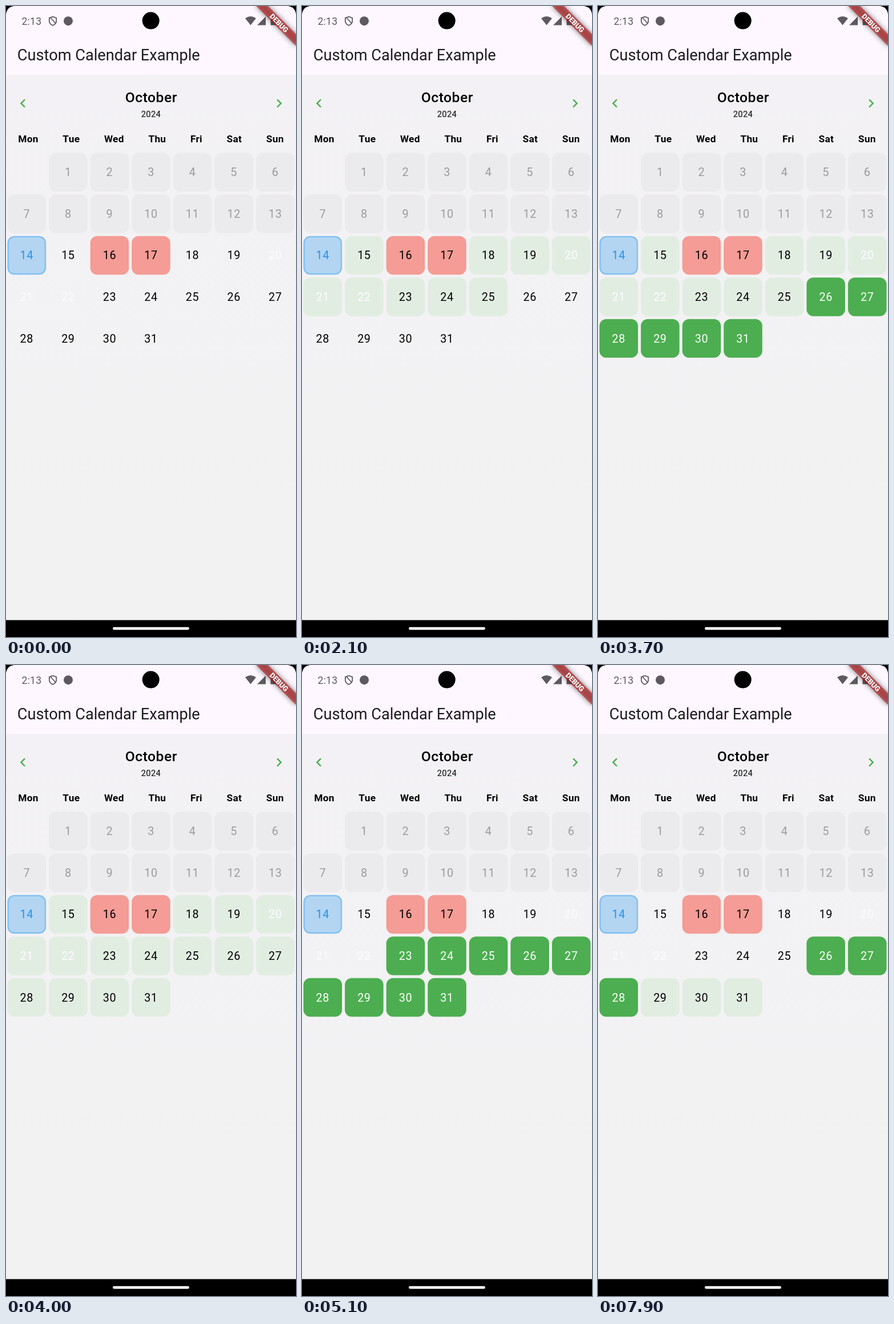
An HTML page that plays this animation: 508x1102 px, repeating every 8 s.

```html
<!DOCTYPE html>
<html lang="en">
<head>
<meta charset="utf-8">
<title>Custom Calendar Example</title>
<style>
  html, body { margin: 0; width: 100%; height: 100%; overflow: hidden; background: #000; }
  body { position: relative; font-family: Roboto, sans-serif; }
  svg { position: absolute; left: 0; top: 0; display: block; }
  text { font-family: Roboto, sans-serif; }
  .mid { text-anchor: middle; }
  #weekdays {
    position: absolute; left: 0; top: 222px; width: 508px;
    display: flex; justify-content: space-around;
    font-size: 17.3px; font-weight: 700; line-height: 20px; letter-spacing: .31px;
  }
</style>
</head>
<body>
<svg width="508" height="1102" viewBox="0 0 508 1102">
  <defs>
    <clipPath id="screen"><path d="M0 1072.4V18Q0 0 18 0H490Q508 0 508 18V1072.4Z"/></clipPath>
    <linearGradient id="page" x1="0" y1="0" x2="0" y2="1">
      <stop offset="0" stop-color="#f3f1f5"/><stop offset="1" stop-color="#f2f2f2"/>
    </linearGradient>
    <filter id="soft" x="-50%" y="-200%" width="200%" height="500%"><feGaussianBlur stdDeviation="4.8"/></filter>
  </defs>

  <g clip-path="url(#screen)">
    <rect width="508" height="1073" fill="url(#page)"/>
    <rect width="508" height="120.5" fill="#fef7ff"/>

    <!-- status bar -->
    <g fill="#5c5a60">
      <text x="27.5" y="32.7" font-size="17.6" letter-spacing=".2">2:13</text>
      <path d="M82 18.7L88.2 21V26Q88.2 31.3 82 34Q75.8 31.3 75.8 26V21ZM78 20.5L87 30.5" fill="none" stroke="#5c5a60" stroke-width="1.8"/>
      <circle cx="109" cy="26.2" r="8"/>
      <path d="M419 21.6Q428.5 14.6 438 21.6L428.5 33.4Z"/>
      <path d="M440 33.4L455 18.4V33.4Z"/>
      <path d="M463.5 20H466.5V18.3H471.5V20H474.5V33.6H463.5Z"/>
    </g>
    <circle cx="253.7" cy="25.6" r="15" fill="#000"/>

    <text x="19.8" y="94.7" font-size="27.2" fill="#1d1b20">Custom Calendar Example</text>

    <!-- month header -->
    <g fill="#4caf50">
      <path transform="translate(14.8 155.2) scale(1.235)" d="M15.41 7.41L14 6L8 12L14 18L15.41 16.59L10.83 12Z"/>
      <path transform="translate(463.6 155.2) scale(1.235)" d="M8.59 16.59L10 18L16 12L10 6L8.59 7.41L13.17 12Z"/>
    </g>
    <text class="mid" x="254.3" y="167.7" font-size="24.7" font-weight="500" letter-spacing=".5">October</text>
    <text class="mid" x="254" y="193.7" font-size="14.8" letter-spacing=".31">2024</text>

    <g id="days"></g>

    <!-- corner ribbon -->
    <g transform="translate(508 0) rotate(45)">
      <rect x="-49.4" y="34.6" width="98.8" height="14.8" fill="#000" fill-opacity=".5" filter="url(#soft)"/>
      <rect x="-49.4" y="34.6" width="98.8" height="14.8" fill="#b71c1c" fill-opacity=".627"/>
      <text class="mid" y="46.5" font-size="12.6" font-weight="900" fill="#fff">DEBUG</text>
    </g>
  </g>
  <rect x="187" y="1084.7" width="134" height="4.8" rx="2.4" fill="#fff"/>
</svg>
<div id="weekdays"><span>Mon</span><span>Tue</span><span>Wed</span><span>Thu</span><span>Fri</span><span>Sat</span><span>Sun</span></div>

<script>
const LOOP = 8000, PITCH = 508 / 7, MARGIN = 2.5, SIZE = PITCH - 2 * MARGIN, TOP = 256.5;
const TODAY = 14, LAST = 31;
const isBooked = d => d === 16 || d === 17;
const isSpecial = d => d >= 20 && d <= 22;

// Each gesture spans a range from its first day to the day under the finger.
// On release the range is selected, or cleared if its first day was selected.
const tap = (time, day) => ({ path: [[time, day]], release: time });
const gestures = [
  { path: [[1100, 15], [1300, 16], [1400, 17], [1500, 18], [1800, 25], [2200, 31]], release: 2700 },
  { path: [[3200, 15], [3300, 16], [3400, 17], [3500, 18], [3700, 25], [3900, 31]], release: 4100 },
  { path: [[4800, 23], [4900, 30], [5000, 31]], release: 5100 },
  tap(5700, 23),
  tap(6400, 24),
  tap(6800, 25),
  { path: [[7500, 29], [7700, 30], [7800, 31]], release: LOOP }
];

function stateAt(time) {
  const selected = new Set(), preview = new Set();
  for (const { path, release } of gestures) {
    const reached = path.filter(([t]) => t <= time);
    if (!reached.length) break;
    const first = path[0][1], current = reached[reached.length - 1][1];
    const clearing = selected.has(first), done = time >= release;
    for (let d = first; d <= current; d++) {
      if (isBooked(d)) continue;
      if (!done) preview.add(d);
      else if (clearing) selected.delete(d);
      else selected.add(d);
    }
  }
  return { selected, preview };
}

// Returns [background, text colour].
function look(day, { selected, preview }) {
  if (day < TODAY) return ['#ebeaed', '#9b9a9d'];
  if (day === TODAY) return ['#b3d5f2', '#2b90e3'];
  if (isBooked(day)) return ['#f49c95', '#000'];
  const plain = isSpecial(day) ? '#fcfcfc' : '#000';
  if (preview.has(day)) return ['#e2ede2', plain];
  if (selected.has(day)) return [isSpecial(day) ? '#f7d7aa' : '#4cae50', '#fff'];
  return ['none', plain];
}

function add(name, attrs) {
  const node = document.createElementNS('http://www.w3.org/2000/svg', name);
  for (const key in attrs) node.setAttribute(key, attrs[key]);
  return document.getElementById('days').appendChild(node);
}

// The month starts on a Tuesday, so the day number is also its grid index.
const cells = Array.from({ length: LAST }, (_, i) => {
  const day = i + 1, x = (day % 7) * PITCH + MARGIN, y = TOP + Math.floor(day / 7) * PITCH;
  const inset = day === TODAY ? 1.2 : 0;
  const box = add('rect', {
    x: x + inset, y: y + inset, width: SIZE - 2 * inset, height: SIZE - 2 * inset, rx: 12 - inset,
    ...(inset && { stroke: '#7fc0f3', 'stroke-width': 2.4 })
  });
  const label = add('text', {
    class: 'mid', x: x + SIZE / 2, y: y + SIZE / 2 + 7, 'font-size': 19.76, 'letter-spacing': .62
  });
  label.textContent = day;
  return { day, box, label };
});

function draw(now) {
  const state = stateAt(now % LOOP);
  for (const { day, box, label } of cells) {
    const [fill, ink] = look(day, state);
    box.setAttribute('fill', fill);
    label.setAttribute('fill', ink);
  }
  requestAnimationFrame(draw);
}
draw(0);
</script>
</body>
</html>
```
